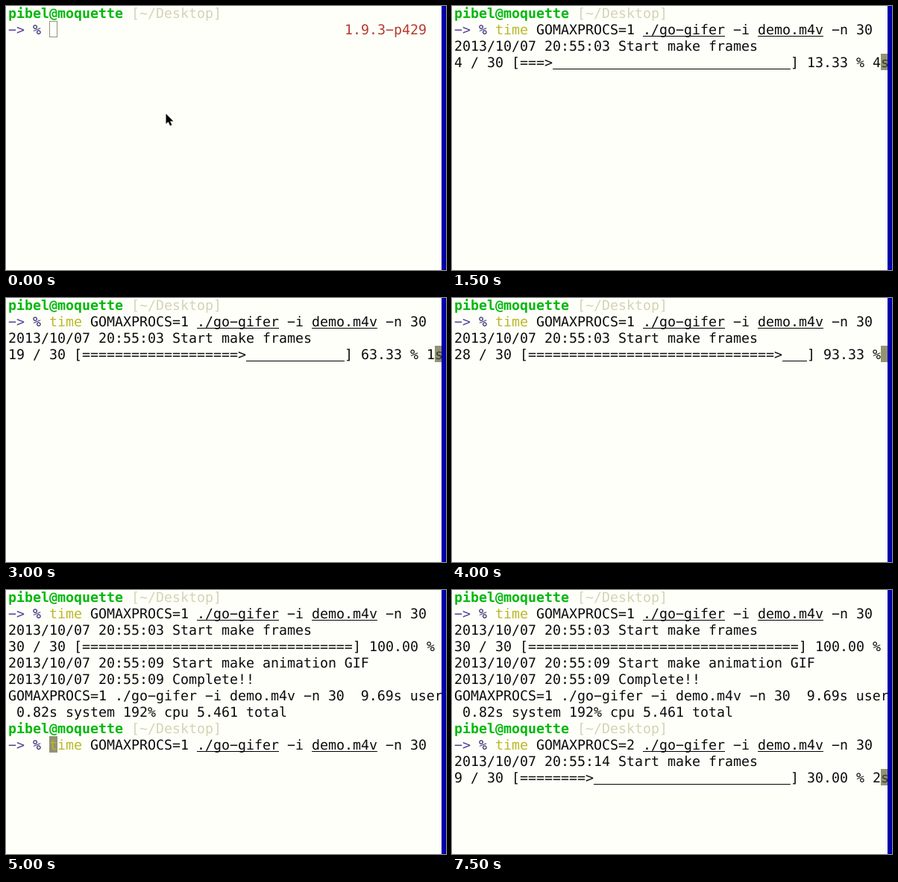
An HTML page for the animation above (8 s loop, 590 px wide and 354 px high).

```html
<!DOCTYPE html>
<html lang="en">
<head>
<meta charset="utf-8">
<title>Terminal session</title>
<style>
html, body { margin: 0; width: 590px; height: 354px; overflow: hidden; background: #fffffa; }
svg { display: block; }
text {
  font: 18.27px "DejaVu Sans Mono", monospace;
  white-space: pre;
  text-rendering: geometricPrecision;
  fill: #0c0c0c;
}
.user { fill: #00b90c; font-weight: bold; }
.path { fill: #d4d4b4; }
.arrow { fill: #553f94; }
.percent { fill: #2c2470; }
.keyword { fill: #b9b728; }
.version { fill: #b43c2c; }
.dim { fill: #3c3c30; }
</style>
</head>
<body>
<svg width="590" height="354" viewBox="0 0 590 354">
  <rect width="590" height="354" fill="#fffffa"/>
  <rect id="cursor" stroke="#939374"/>
  <g id="screen"></g>
  <rect x="584" width="6" height="354" fill="#0000a8"/>
  <path id="pointer" d="M214.5 144.5V158L217.6 155.2L220 160.6L222.4 159.5L220 154.4H224.4Z"
        fill="#000" stroke="#fff" stroke-width="2" paint-order="stroke"/>
</svg>
<script>
const STEP = 500, STEPS = 16, COLS = 53, FRAMES = 30;
const CELL = 11, ROW = 22, LEFT = 3, BASELINE = 16;
const firstRun = [4, 9, 14, 19, 24, 28];
const secondRun = [3, 9];
const byId = id => document.getElementById(id);

// A row is a list of [text, class, column] parts; column defaults to the end of the previous part.
const plain = text => [[text]];
const header = () => [["pibel@moquette", "user"], [" [~/Desktop]", "path"]];
const prompt = () => [["->", "arrow"], [" %", "percent"]];
const idle = () => [...prompt(), ["1.9.3-p429", "version", 41]];
const command = procs => [
  ...prompt(), [" time", "keyword"], [` GOMAXPROCS=${procs} `], ["./go-gifer", "file"],
  [" -i "], ["demo.m4v", "file"], [" -n 30"]
];
const started = time => plain(`2013/10/07 ${time} Start make frames`);

function progress(count, rate) {
  const seconds = Math.floor((FRAMES - count) / rate);
  const head = `${count} / ${FRAMES} [`;
  const tail = `] ${(count / FRAMES * 100).toFixed(2)} % ${seconds ? seconds + "s" : ""}`;
  const width = COLS - head.length - tail.length;
  const filled = Math.floor(count * width / FRAMES);
  const tip = count < FRAMES ? ">" : "=";
  const done = head + "=".repeat(filled - 1) + tip;
  return [
    [done], [" ".repeat(width - filled), "file"],
    [tail.slice(0, -1)], [tail.slice(-1), "dim"]
  ];
}

function finishedRun() {
  return [
    header(), command(1), started("20:55:03"), progress(FRAMES, 1),
    plain("2013/10/07 20:55:09 Start make animation GIF"),
    plain("2013/10/07 20:55:09 Complete!!"),
    plain("GOMAXPROCS=1 ./go-gifer -i demo.m4v -n 30  9.69s user"),
    plain(" 0.82s system 192% cpu 5.461 total"),
    header()
  ];
}

// Returns the rows on screen and the cursor's column; the cursor is always on the last row.
function session(step) {
  if (step === 0) return [[header(), idle()], 5];
  if (step < 3) return [[header(), command(1)], 51];
  if (step < 9) {
    return [[header(), command(1), started("20:55:03"), progress(firstRun[step - 3], 6.2)], COLS - 1];
  }
  const rows = finishedRun();
  if (step === 9) return [[...rows, idle()], 5];
  if (step < 14) return [[...rows, command(step === 13 ? "" : 1)], [5, 10, 19, 21][step - 10]];
  return [[...rows, command(2), started("20:55:14"), progress(secondRun[step - 14], 8)], COLS - 1];
}

function rowMarkup(parts, row) {
  const y = row * ROW + BASELINE;
  let next = 0;
  return parts.map(([text, style = "", column = next]) => {
    next = column + text.length;
    // Leading blanks become an offset so every part starts on its own cell.
    const body = text.trimStart();
    const x = LEFT + (next - body.length) * CELL;
    // The minus sign has the wide dash of the terminal font.
    const safe = body.replace(/>/g, "&gt;").replace(/-/g, "\u2212");
    const line = style === "file"
      ? `<rect x="${LEFT + column * CELL}" y="${y + 2}" width="${text.length * CELL}" height="1"/>` : "";
    return `<text x="${x}" y="${y}" class="${style}">${safe}</text>${line}`;
  }).join("");
}

function draw(step) {
  const [rows, column] = session(step);
  const focused = step > 0;
  byId("screen").innerHTML = rows.map(rowMarkup).join("");
  const box = {
    x: LEFT + column * CELL + 0.5, y: (rows.length - 1) * ROW - 1.5,
    width: CELL - 1, height: ROW - 1, fill: focused ? "#939374" : "none"
  };
  for (const key in box) byId("cursor").setAttribute(key, box[key]);
  byId("pointer").style.display = focused ? "none" : "";
}

let shown = -1;
const start = performance.now();
function tick() {
  const step = Math.floor(Math.max(0, performance.now() - start) / STEP) % STEPS;
  if (step !== shown) draw(shown = step);
  requestAnimationFrame(tick);
}
tick();
</script>
</body>
</html>
```
